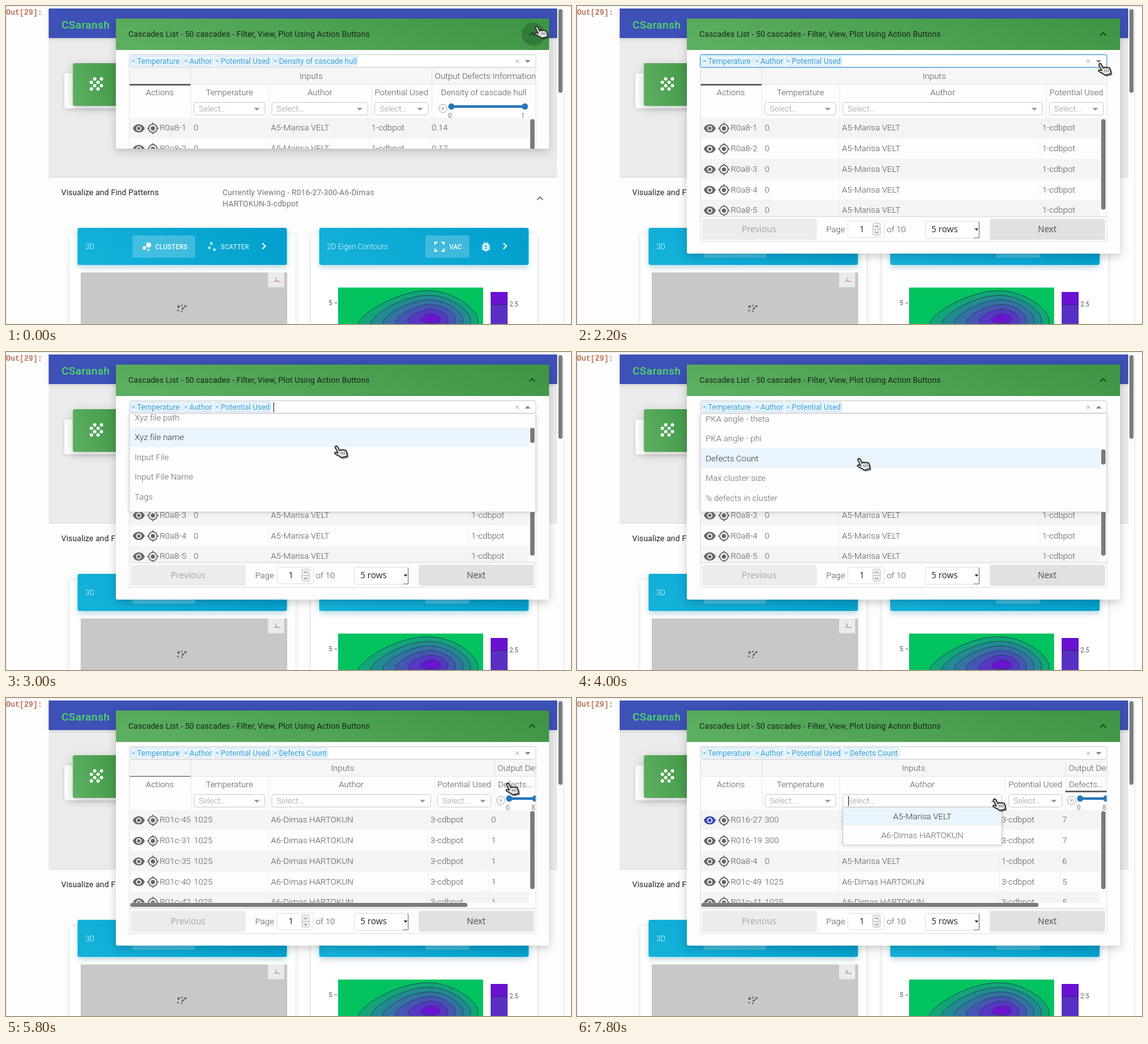
An HTML page for the animation above (8 s loop, 900 by 506 pixels).

```html
<!DOCTYPE html>
<html lang="en">
<head>
<meta charset="utf-8">
<title>Cascades list</title>
<style>
html, body { margin: 0; width: 100%; height: 100%; overflow: hidden; background: #fdfdfd; }
svg { font-family: Roboto, sans-serif; }
#stage { display: block; width: 100vw; height: 100vh; }
text { white-space: pre; }
.shadow { filter: drop-shadow(0 4px 7px rgba(0,0,0,.2)); }
.glow { filter: drop-shadow(0 4px 5px rgba(0,110,140,.28)); }
.soft { filter: drop-shadow(0 1px 3px rgba(0,0,0,.14)); }
</style>
</head>
<body>
<svg id="stage" viewBox="0 0 900 506" preserveAspectRatio="none">
  <defs>
    <linearGradient id="green" x1="0" x2="1" y1=".6" y2=".4"><stop stop-color="#5cae60"/><stop offset="1" stop-color="#3f9545"/></linearGradient>
    <linearGradient id="cyan" x1="0" x2="1" y1=".6" y2=".4"><stop stop-color="#14b1d9"/><stop offset="1" stop-color="#03a0cd"/></linearGradient>
  </defs>
  <g id="page"></g>
  <g id="live"></g>
</svg>
<script>
const LOOP = 8000, STEP = 200;
const AUTHOR_A = 'A5-Marisa VELT', AUTHOR_B = 'A6-Dimas HARTOKUN';

const rect = (x, y, w, h, fill, more = '') =>
  `<rect x="${x}" y="${y}" width="${w}" height="${h}" fill="${fill}" ${more}/>`;
const box = (x, y, w, h, stroke = '#ccc', fill = '#fff', r = 3) =>
  rect(x + .5, y + .5, w - 1, h - 1, fill, `stroke="${stroke}" rx="${r}"`);
const line = (d, stroke, width = 1) =>
  `<path d="${d}" fill="none" stroke="${stroke}" stroke-width="${width}"/>`;
const shape = (d, fill, more = '') => `<path d="${d}" fill="${fill}" ${more}/>`;
const dot = (x, y, r, fill, more = '') => `<circle cx="${x}" cy="${y}" r="${r}" fill="${fill}" ${more}/>`;
// y is the middle of the capitals
const text = (x, y, s, size = 13.5, fill = '#555', more = 'font-weight="300"') =>
  `<text x="${x}" y="${y + size * .355}" font-size="${size}" fill="${fill}" ${more}>${s}</text>`;
const mid = 'text-anchor="middle" font-weight="300"';
const heading = 'letter-spacing=".14"';
const button = 'font-weight="500" letter-spacing=".28"';
const noto = 'text-anchor="middle" font-family="Noto Sans, sans-serif"';
const icon = (x, y, scale, inner) =>
  `<g transform="translate(${x - 12 * scale} ${y - 12 * scale}) scale(${scale})">${inner}</g>`;
const crop = (x, y, w, h, inner) =>
  `<svg x="${x}" y="${y}" width="${w}" height="${h}" viewBox="${x} ${y} ${w} ${h}">${inner}</svg>`;
const chevron = (x, y, dx, dy, color, width = 1.7) =>
  line(dx ? `M${x - 2.5} ${y - 4.5}l4.5 4.5l-4.5 4.5` : `M${x - 4.5} ${y + 2.5}l4.5 -4.5l4.5 4.5`, color, width);
const caretArrow = (x, y, up, color = '#888') =>
  shape(`M${x - 4.5} ${y + (up ? 2 : -2)}h9l-4.5 ${up ? -4.5 : 4.5}z`, color);
const cross = (x, y, r, color, width = 1) =>
  line(`M${x - r} ${y - r}l${2 * r} ${2 * r}m0 ${-2 * r}l${-2 * r} ${2 * r}`, color, width);

const EYE = 'M12 4.5C7 4.5 2.7 7.6 1 12c1.7 4.4 6 7.5 11 7.5s9.3-3.1 11-7.5c-1.7-4.4-6-7.5-11-7.5zM12 17a5 5 0 1 1 0-10a5 5 0 0 1 0 10zm0-8a3 3 0 1 0 0 6a3 3 0 0 0 0-6z';
const BUG = 'M20 8h-2.8a6 6 0 0 0-1.8-2L17 4.4 15.6 3l-2.2 2.2a6 6 0 0 0-2.8 0L8.4 3 7 4.4 8.6 6a6 6 0 0 0-1.8 2H4v2h2.1L6 12H4v2h2l.1 2H4v2h2.8a6 6 0 0 0 10.4 0H20v-2h-2.1l.1-2h2v-2h-2l-.1-2H20zm-6 8h-4v-2h4zm0-4h-4v-2h4z';
const target = dot(12, 12, 4, '#666') + dot(12, 12, 8, 'none', 'stroke="#666" stroke-width="2"') +
  line('M12 1v3M12 20v3M1 12h3M20 12h3', '#666', 2);
const circles = (list, fill) => list.map(([x, y, r]) => dot(x, y, r, fill)).join('');

// closed egg shapes, drawn out to the lower left and shrinking towards one centre
function contours() {
  const fills = ['#12a578', '#218a92', '#3472a3', '#4555b3', '#5538c3', '#6a14d2'];
  return fills.map((fill, i) => {
    const k = 1 - i / 6;
    const egg = 'M-118 6C-106-14-52-44-8-44C34-44 72-14 72 4C72 34 40 46 0 46C-50 46-130 36-118 6z';
    return shape(egg, fill, `transform="translate(680 497) scale(${k})" stroke="#263a4a" ` +
      'stroke-width=".8" vector-effect="non-scaling-stroke"');
  }).join('');
}

function card(x, title) {
  return rect(x, 363, 360, 160, '#fff', 'rx="4" class="soft"') +
    rect(x + 13, 353, 333.5, 59, 'url(#cyan)', 'rx="3" class="glow"') +
    text(x + 25.5, 382.5, title, 11.9, '#e6f7fc');
}

function page() {
  const grain = [[10, 14], [6, 10], [6, 18], [18, 6], [14, 18], [18, 14], [14, 10], [10, 6]].map(p => [...p, 2]);
  const corners = 'M5 9V5h4M15 5h4v4M19 15v4h-4M9 19H5v-4';
  return rect(0, 0, 900, 506, '#fdfdfd') + line('M0 .5H900M.5 0V506', '#ececec') +
    text(0, 10, 'Out[29]:', 12, '#bd7258', 'font-weight="bold" font-family="Liberation Mono, monospace"') +
    rect(68, 51, 810, 221.5, '#ebebec') + line('M68 272.5H878', '#dcdcdc') +
    rect(68, 4, 810, 47, '#3d51b6', 'class="soft"') +
    text(88.5, 30, 'CSaransh', 17, '#4fdc64', 'font-weight="500" letter-spacing=".45"') +
    line('M888.5 4V506', '#e4e4e4') + rect(880, 5, 6.5, 133, '#7b7b7b', 'rx="3"') +
    rect(93, 107, 200, 56, '#fdfdfd', 'rx="4" class="soft"') +
    rect(106.5, 91, 90, 68, 'url(#green)', 'rx="3" class="shadow"') +
    icon(144, 124, 1.33, circles(grain, '#fff')) +
    text(88, 297, 'Visualize and Find Patterns', 12.55, '#222', heading) +
    text(345, 297, 'Currently Viewing - R016-27-300-A6-Dimas', 12.55, '#777', heading) +
    text(345, 314.5, 'HARTOKUN-3-cdbpot', 12.55, '#777', heading) +
    chevron(850.5, 306, 0, 1, '#666') +
    card(101, '3D') + rect(201.5, 365, 100, 35.5, '#fff', 'opacity=".22" rx="2"') +
    icon(224.5, 383, .83, circles([[7.2, 14.4, 3.2], [14.8, 18, 2], [15.2, 8.8, 4.8]], '#fff')) +
    text(238, 383, 'CLUSTERS', 10.1, '#fff', button) +
    icon(328, 383, .83, circles([[7, 14, 3], [11, 6, 3], [16.6, 17.6, 3]], '#a3dff0')) +
    text(342, 383, 'SCATTER', 10.1, '#c2eaf5', button) + chevron(411, 382, 1, 0, '#fff', 2) +
    rect(119, 424, 329, 90, '#c9c8c9') + rect(417.5, 424, 25.5, 23.5, '#ebebeb') +
    line('M430 437V432', '#4a9bd8') + line('M430 437l-3 2', '#4aa94a') + line('M430 437l7 2', '#c86a3a') +
    circles([[275, 478, 2], [280, 476.5, 1.5], [286, 477.5, 1.8], [274, 484.5, 1.6], [282, 481, 1.8], [280, 486, 1.4]], '#777') +
    circles([[274.5, 479, 1], [285, 478.5, .9], [281, 482, 1]], '#333') +
    card(486, '2D Eigen Contours') + rect(668, 365, 70, 35.5, '#fff', 'opacity=".22" rx="2"') +
    icon(690.5, 383, 1, line(corners, '#fff', 2)) + text(706, 383, 'VAC', 10.1, '#fff', button) +
    icon(764.5, 383, .83, shape(BUG, '#d5f1f9')) + chevron(795, 382, 1, 0, '#fff', 2) +
    crop(529, 448, 231, 58, rect(529, 448, 231, 58, '#00c360') + contours()) +
    text(514, 472.5, '5', 10, '#555', '') + line('M523 472.5h5', '#777') +
    rect(772, 455, 27, 60, '#5a2fc3') + rect(772, 455, 27, 20, '#6813d0') +
    line('M772 475H799', '#35256a') + text(802, 474.5, '2.5', 10, '#555', '');
}

const LAYOUTS = {
  hull: { edges: [196, 294, 418, 582, 678, 844], cells: [245, 299, 422, 582, 678], last: 'Density of cascade hull', bar: 640 },
  three: { edges: [196, 294, 418, 747, 844], cells: [245, 299, 422, 741] },
  defects: { edges: [196, 294, 418, 682, 778, 844], cells: [245, 299, 422, 676, 773], last: 'Defects...', bar: 537 }
};

const plain = values => values.map((v, i) => [`R0a8-${i + 1}`, '0', AUTHOR_A, '1-cdbpot', v]);
const heavy = (id, v, temp = '1025') => [id, temp, AUTHOR_B, '3-cdbpot', v];
const ROWS = {
  hull: plain(['0.14', '0.17', '0.01', '0.38', '0.17']),
  count: plain([3, 4, 2, 6, 3]),
  up: [heavy('R01c-45', 0), heavy('R01c-31', 1), heavy('R01c-35', 1), heavy('R01c-40', 1), heavy('R01c-42', 1)],
  down: [heavy('R016-27', 7, '300'), heavy('R016-19', 7, '300'), plain([0, 0, 0, 6])[3], heavy('R01c-49', 5), heavy('R01c-41', 5)]
};

const OPTIONS = ['Cascade Id', 'Energy', 'Substrate', 'Simulation Code', 'Info File', 'Xyz file path', 'Xyz file name',
  'Input File', 'Input File Name', 'Tags', 'Box size', 'PKA time', 'PKA position', 'PKA angle - theta', 'PKA angle - phi',
  'Defects Count', 'Max cluster size', '% defects in cluster', 'Clusters count', 'Density of cascade hull'];
const ITEM = 31.5, LIST_HEIGHT = 36.3 * ITEM;

// time, x, y of the finger tip
const CURSOR = [[0, 845, 33], [200, 845, 33], [400, 770, 50], [600, 540, 84], [800, 428, 86], [1200, 428, 86],
  [1400, 470, 90], [1800, 760, 92], [2000, 833, 92], [2400, 833, 92], [2600, 790, 105], [2800, 620, 140],
  [3000, 526, 150], [3400, 490, 160], [4000, 449, 170], [4400, 449, 170], [4800, 600, 150], [5200, 780, 138],
  [5400, 799, 136], [6600, 799, 136], [7000, 720, 150], [7200, 665, 161], [8000, 665, 161]];
const SCROLL = [[0, 0], [2600, 0], [2800, 70], [3000, 167.5], [3400, 245], [4000, 417.5], [8000, 417.5]];
const HEIGHT = [[0, 207], [200, 362], [400, 374], [8000, 374]];

function at(table, t, col = 1) {
  const i = Math.max(1, table.findIndex(k => k[0] >= t)), a = table[i - 1], b = table[i];
  return a[col] + (b[col] - a[col]) * (t - a[0]) / (b[0] - a[0]);
}

function selectBox(tags, focused, open, caret) {
  const starts = [198, 281.5, 331.5, 424], ends = [280, 329, 422];
  let out = (focused ? rect(194.5, 75.5, 651, 24, '#d9ecfa', 'rx="4"') : '') +
    box(196, 77, 648.5, 21, focused ? '#2f8fd6' : '#ccc');
  tags.forEach((tag, i) => {
    const x = starts[i], end = ends[i] || (tag.length > 15 ? 560 : 513);
    out += box(x, 79, end - x, 16.5, '#bcdff5', '#ebf5ff', 2) + line(`M${x + 9.5} 79.5v15.5`, '#c8e4f6') +
      cross(x + 5, 87.5, 2.1, '#3a9fd0') + text(x + 10.7, 87.5, tag, 12.05, '#3aa0d2', '');
  });
  return out + cross(814.5, 88, 2.8, '#999') + caretArrow(831, 88, open) +
    (open && caret ? line('M426.5 80V96', '#222') : '');
}

function filterBox(x, end, open, caret) {
  return box(x, 153, end - x, 21) + text(x + 8, 163.5, 'Select...', 13, '#999') +
    caretArrow(end - 13.5, 164, open, '#999') + (caret ? line(`M${x + 9.5} 156V172`, '#222') : '');
}

function slider(x, end, max) {
  const blue = '#2676b8';
  return dot(x - 13.5, 163, 6.5, 'none', 'stroke="#aaa"') + cross(x - 13.5, 163, 2.5, '#999') +
    rect(x, 158, end - x, 4, blue) + dot(x, 160, 5, blue) + dot(end, 160, 5, blue) +
    text(x - 5, 174, '0', 10, '#777', '') + text(end - 6, 174, max, 10, '#777', '');
}

function table(t, kind, rows, authorOpen, caret) {
  const { edges, cells, last, bar } = LAYOUTS[kind];
  const inputsEnd = edges[4], center = i => (edges[i] + edges[i + 1]) / 2;
  const titles = ['Actions', 'Temperature', 'Author', 'Potential Used', last];
  let out = rect(196, 98, 648.5, 277, '#fdfdfd') + rect(196, 98, 648.5, 26, '#f6f6f6') +
    line('M196 124.5H845M294.5 98V124', '#e2e2e2') + line('M196 178.5H845', '#eee') +
    text((294 + inputsEnd) / 2, 111.5, 'Inputs', 13.5, '#555', mid);
  if (last) out += line('M' + (inputsEnd + .5) + ' 98V124', '#e2e2e2') +
    text(inputsEnd + 5, 111.5, 'Output Defects Information');
  for (let i = 0; i < edges.length - 1; i++)
    out += text(center(i), 137.5, titles[i], 13.5, '#555', mid) +
      (i ? line(`M${edges[i] + .5} 125V178`, '#ebebeb') : '');

  if (t < 5800) out += rect(196, 124, 98, 2.5, '#555');
  else if (t < 6000) out += rect(196, 124, 98, 1.2, '#666');
  else if (t < 6400) out += rect(778, 124, 66, 2.5, '#555');
  else out += rect(778, 147.5, 66, 2.5, '#555');

  out += filterBox(299, 413) + filterBox(423, edges[3] - 5, authorOpen, authorOpen && caret) +
    filterBox(edges[3] + 5, inputsEnd - 5);
  if (kind == 'hull') out += slider(709.5, 826.5, '1');
  if (kind == 'defects') out += slider(801.5, 843, '8');

  const bottom = last ? 325.5 : 334.5;
  out += crop(196, 178, 649, bottom - 178, rows.map((row, i) => {
    const y = 193.7 + 32.7 * i, eye = row[0] == 'R016-27' ? '#3646b0' : '#666';
    return rect(196, y - 16, 637, 32.7, i % 2 ? '#fdfdfd' : '#f4f4f4') +
      cells.slice(2).map(x => line(`M${x - 3.5} ${y - 16}v32.7`, '#f1f1f1')).join('') +
      icon(211.5, y + 1, .86, shape(EYE, eye, 'fill-rule="evenodd"')) + icon(234, y + 1, .84, target) +
      cells.map((x, c) => text(x, y, row[c])).join('');
  }).join('')) + rect(835, 180, 7, last ? 124 : 144, '#7b7b7b', 'rx="3"');
  if (bar) out += rect(198, 326, bar, 6.5, '#7b7b7b', 'rx="3"');
  return crop(196, 98, 648.5, 277, out + pager()) + line('M196.5 98V375M844 98V375M196 374.5H844', '#e0e0e0');
}

function pager() {
  return rect(196, 335, 649, 40, '#fdfdfd') + line('M196 335H845', '#e6e6e6', 2) +
    rect(199, 338.5, 183, 33.5, '#ececec', 'rx="3"') + text(290, 355.5, 'Previous', 13.7, '#aaa', noto) +
    rect(657.5, 338.5, 183.5, 33.5, '#e1e0e2', 'rx="3"') + text(749, 355.5, 'Next', 13.7, '#555', noto) +
    text(397, 355.5, 'Page') + text(493.5, 355.5, 'of 10') +
    box(431, 342, 59, 27, '#e2e2e2') + text(454, 355.5, '1', 13.7, '#333', noto) +
    box(471, 345, 12.5, 20, '#bbb', '#f3f3f3', 2) + line('M471 355.5h12', '#bbb') +
    line('M474.5 352l2.7-2.7 2.7 2.7M474.5 359l2.7 2.7 2.7-2.7', '#444') +
    box(554.5, 342, 87, 28, '#ddd') + text(585.5, 355.5, '5 rows', 13.7, '#333', noto) +
    line('M632.5 343.5V368', '#eee') + line('M640.5 343V369H632', '#777') + shape('M633.5 354h6l-3 3.5z', '#222');
}

function optionList(scroll, pointerY) {
  const hover = Math.floor((pointerY - 98 + scroll) / ITEM);
  const items = OPTIONS.map((name, i) => {
    const y = 98 + i * ITEM - scroll;
    return (i == hover ? rect(197, y, 636, ITEM, '#eaf4fc') : '') +
      text(205, y + 16, name, 13.5, i == hover ? '#333' : '#666');
  }).join('');
  return rect(196, 98, 648.5, 156.5, '#fdfdfd', 'class="soft"') + crop(196, 98, 649, 156, items) +
    line('M196.5 98V254.5H844V98', '#ccc') +
    rect(835, 98 + scroll * 156 / LIST_HEIGHT, 7, 24, '#7b7b7b', 'rx="3"');
}

function authorList() {
  return rect(423, 174, 254, 60, '#fdfdfd', 'class="soft"') + rect(423, 174, 254, 29, '#eaf4fc') +
    line('M423.5 174V234H676.5V174', '#ccc') +
    text(550, 188.5, AUTHOR_A, 13.5, '#333', mid) + text(550, 218.5, AUTHOR_B, 13.5, '#666', mid);
}

function hand(x, y) {
  const d = 'M-1.8 1.5C-1.8-.8 1.6-.8 1.9 1.5L3 7l2-.6 2 1.2 2-.3 1.5 1.4 1.7.3 .5 3.5-.6 5.5h-8.6l-3.8-4.2-4-3.6c-.7-1.9 1.2-2.4 3-1.2l1.4 1z';
  return `<g transform="translate(${x} ${y}) rotate(-14) scale(1.1)">` +
    shape(d, '#000', 'opacity=".35" transform="translate(1.5 2.5)"') +
    shape(d, '#e2e2e2', 'stroke="#333" stroke-width="1.7" stroke-linejoin="round"') +
    line('M4.5 10v3M7 10.5v3M9.5 11v3', '#666') + '</g>';
}

function live(t) {
  const x = at(CURSOR, t), y = at(CURSOR, t, 2), height = at(HEIGHT, t);
  const kind = t < 1200 ? 'hull' : t < 4400 ? 'three' : 'defects';
  const rows = ROWS[t < 4400 ? 'hull' : t < 5800 ? 'count' : t < 6400 ? 'up' : 'down'];
  const open = t >= 2400 && t < 4400, authorOpen = t >= 7600;
  const caret = (t + 700) % 1200 < 600;
  const tags = ['Temperature', 'Author', 'Potential Used'];
  if (kind == 'hull') tags.push('Density of cascade hull');
  if (kind == 'defects') tags.push('Defects Count');
  return rect(175, 20, 690, height, '#fdfdfd', 'rx="3" class="shadow"') +
    crop(175, 20, 690, height,
      rect(175, 20, 690, 50, 'url(#green)') +
      (t < 400 ? dot(840, 45, 18.5, '#1f5a2c', `opacity="${t ? .2 : .45}"`) : '') +
      text(195, 45, 'Cascades List - 50 cascades - Filter, View, Plot Using Action Buttons', 12.5, '#16241a', heading) +
      chevron(838, 44.5, 0, 1, '#1d3a22') +
      table(t, kind, rows, authorOpen, caret) +
      selectBox(tags, t >= 1200 && t < 2400, open, caret) +
      (open ? optionList(at(SCROLL, t), y) : '') + (authorOpen ? authorList() : '')) +
    hand(x, y);
}

document.getElementById('page').innerHTML = page();
const layer = document.getElementById('live');
const start = performance.now();
let shown = -1;
function tick() {
  const t = Math.floor((performance.now() - start) % LOOP / STEP) * STEP;
  if (t != shown) layer.innerHTML = live(shown = t);
  requestAnimationFrame(tick);
}
tick();
</script>
</body>
</html>
```
